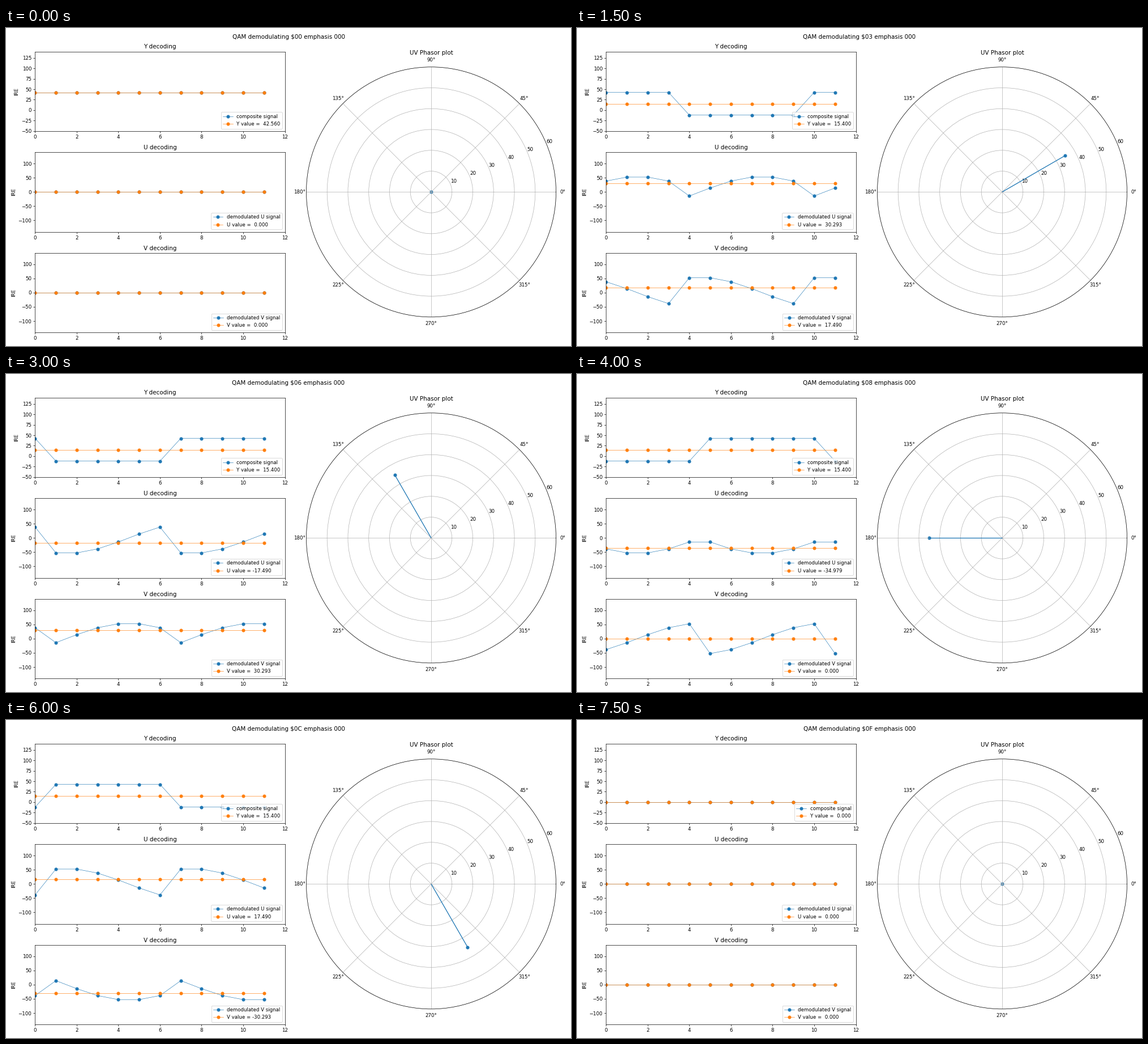
Animation, 998 px wide and 561 px high, one loop 8 s. Source, as a matplotlib script:

```python
import numpy as np
import matplotlib.pyplot as plt
from matplotlib.animation import FuncAnimation

W, H = 998, 561
DPI = W / 16
HIGH, LOW = 42.56, -11.76   # IRE levels of the square wave
STEPS = np.arange(12)
CARRIER = np.radians(45 + 30 * STEPS)


def decode(hue):
    """Return composite, U and V samples with their averages."""
    if hue == 0:
        wave = np.full(12, HIGH)
    elif hue == 13:
        wave = np.full(12, LOW)
    elif hue > 13:
        wave = np.zeros(12)
    else:
        wave = np.where((STEPS + hue - 1) % 12 < 6, HIGH, LOW)
    luma = wave.mean()
    chroma = 2 * (wave - luma)
    signals = wave, chroma * np.sin(CARRIER), chroma * np.cos(CARRIER)
    # adding zero turns -0.0 into 0.0
    return signals, [round(s.mean(), 6) + 0.0 for s in signals]


def box(left, top, width, height):
    return [left / W, 1 - (top + height) / H, width / W, height / H]


class Panel:
    def __init__(self, fig, name, label, top, limits, ticks):
        self.name = name
        ax = fig.add_axes(box(51.4, top, 441.1, 140.4))
        ax.set_title(f"{name} decoding")
        ax.set_ylabel("IRE")
        style = dict(marker="o", linewidth=0.7)
        self.signal, = ax.plot(STEPS, 0 * STEPS, label=label, **style)
        self.average, = ax.plot(STEPS, 0 * STEPS, label="value", **style)
        ax.set_xticks(range(0, 13, 2))
        ax.set_yticks(ticks)
        ax.set_xlim(0, 12)
        ax.set_ylim(*limits)
        self.caption = ax.legend(loc="lower right").get_texts()[1]

    def show(self, samples, value):
        self.signal.set_ydata(samples)
        self.average.set_ydata(np.full(12, value))
        self.caption.set_text(f"{self.name} value = {value: .3f}")


fig = plt.figure(figsize=(W / DPI, H / DPI), dpi=DPI)
heading = fig.suptitle("")

wide = (-140, 140), range(-100, 101, 50)
panels = [
    Panel(fig, "Y", "composite signal", 41.5, (-50, 140), range(-50, 126, 25)),
    Panel(fig, "U", "demodulated U signal", 219.1, *wide),
    Panel(fig, "V", "demodulated V signal", 396.7, *wide),
]

polar = fig.add_axes(box(530.45, 68.75, 441.1, 441.1), projection="polar")
polar.set_title("UV Phasor plot")
dot = polar.scatter([0], [0])
arm = polar.vlines(0, 0, 1)
polar.set_yticks(range(10, 61, 10))
polar.set_ylim(0, 60)


def update(hue):
    heading.set_text(f"QAM demodulating ${hue:02X} emphasis 000")
    signals, values = decode(hue)
    for panel, samples, value in zip(panels, signals, values):
        panel.show(samples, value)
    _, u, v = values
    angle, radius = np.arctan2(v, u), np.hypot(u, v)
    dot.set_offsets([[angle, radius]])
    arm.set_segments([[(angle, 0), (angle, radius)]])


anim = FuncAnimation(fig, update, frames=16, interval=500, repeat=True,
                     repeat_delay=0, blit=False)
plt.show()
```
